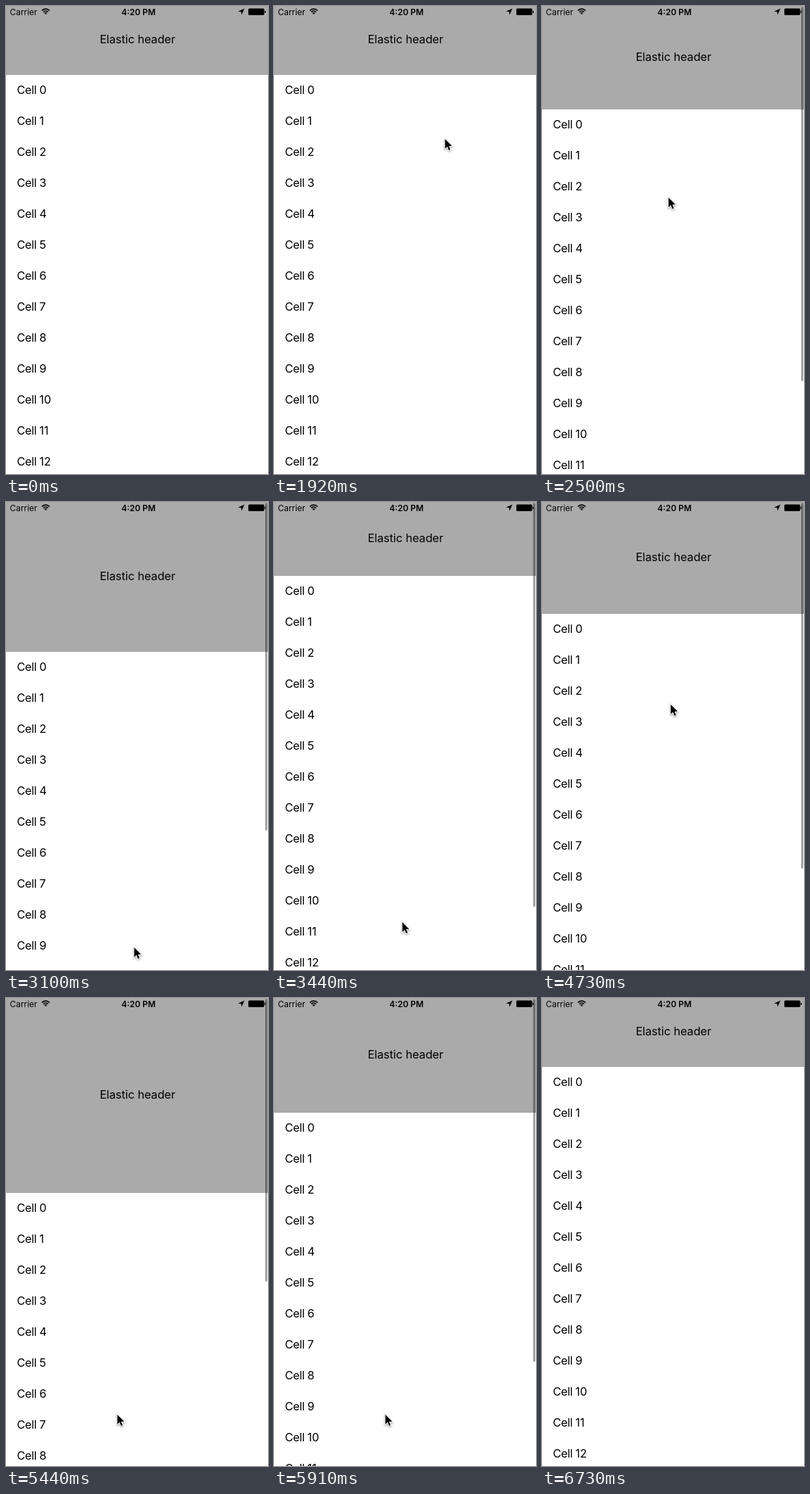
Write an HTML page with a canvas that moves like this. It is 373 px wide and 665 px high and loops after 6970 ms.

```html
<!DOCTYPE html>
<html lang="en">
<head>
<meta charset="utf-8">
<title>Elastic header</title>
<style>
  html, body { margin: 0; width: 100%; height: 100%; overflow: hidden; background: #fff; }
  canvas { display: block; }
</style>
</head>
<body>
<canvas id="stage" width="373" height="665"></canvas>
<script>
const W = 373, H = 665, LOOP = 6970, STEP = 117.2, START = 1908;
const REST = 98, ROW = 44, LAG = .15;
const FONT = 'Inter, Roboto, "Liberation Sans", sans-serif';
const ctx = document.getElementById('stage').getContext('2d');

// Pointer strokes, timed in steps after START
const home = { x: 243.5, y: 189 };
const moves = [
  { from: 0, to: 3, x: 180, y: 146 },
  { from: 4, to: 7, x: 182.5, y: 633 },
  { from: 12, to: 17, x: 201.5, y: 288 },
  { from: 17, to: 22, x: 186, y: 148 },
  { from: 22, to: 27.35, x: 158.5, y: 592 },
  { from: 34, to: 40, x: 284, y: 646 }
];
const drags = [
  { down: 4, release: 8.93, hide: 17 },
  { down: 22, release: 32.3, hide: 41 }
];

const clamp = v => Math.max(0, Math.min(1, v));
const ease = f => f * f * (3 - 2 * f);

function pointerAt(k) {
  return moves.reduce((p, m) => {
    const e = ease(clamp((k - m.from) / (m.to - m.from)));
    return { x: p.x + (m.x - p.x) * e * e, y: p.y + (m.y - p.y) * e };
  }, home);
}

const rubberBand = d => H * (1 - 1 / (1 + .55 * d / H));

// Critically damped return to rest
function bounce(steps) {
  const x = 1.277 * Math.max(0, steps);
  return (1 + x) * Math.exp(-x);
}

function overscroll(drag, k) {
  const held = Math.min(k, drag.release) - LAG;
  const distance = pointerAt(held).y - pointerAt(drag.down).y;
  return rubberBand(distance) * bounce(k - drag.release);
}

function text(str, x, y, size, spacing = 0, align = 'left', weight = 400) {
  ctx.font = `${weight} ${size}px ${FONT}`;
  ctx.letterSpacing = spacing + 'px';
  ctx.textAlign = align;
  ctx.fillText(str, x, y);
}

function polygon(...points) {
  ctx.beginPath();
  points.forEach(([x, y]) => ctx.lineTo(x, y));
  ctx.closePath();
}

function pill(x, y, w, h, r) {
  ctx.beginPath();
  ctx.roundRect(x, y, w, h, r);
  ctx.fill();
}

function drawStatus() {
  text('Carrier', 5.6, 12.5, 11.9);
  text('4:20 PM', 188.6, 12.5, 11.9, 0, 'center', 600);

  const from = -Math.PI * .75, to = -Math.PI / 4;
  ctx.lineWidth = 1.7;
  for (const r of [4.8, 7.8]) {
    ctx.beginPath();
    ctx.arc(56.5, 12, r, from, to);
    ctx.stroke();
  }
  ctx.beginPath();
  ctx.moveTo(56.5, 12);
  ctx.arc(56.5, 12, 2.8, from, to);
  ctx.fill();

  polygon([339.5, 3.5], [335.3, 12.7], [334.8, 8.2], [330.3, 7.7]);
  ctx.fill();

  pill(345, 3.5, 22.6, 9.4, 1.6);
  pill(368.3, 6.7, 1.4, 3.2, .7);
}

function drawPointer({ x, y }) {
  ctx.save();
  ctx.translate(x, y);
  polygon([0, 0], [0, 13.8], [3.2, 10.8], [5.4, 16], [7.6, 15], [5.4, 10], [9.8, 9.8]);
  ctx.shadowColor = 'rgba(0,0,0,.45)';
  ctx.shadowBlur = 2.5;
  ctx.shadowOffsetY = 1;
  ctx.strokeStyle = '#fff';
  ctx.lineWidth = 2;
  ctx.stroke();
  ctx.shadowColor = 'transparent';
  ctx.fill();
  ctx.restore();
}

function draw(time) {
  const k = Math.floor((time % LOOP - START) / STEP);
  const drag = drags.find(d => k > d.down && k < d.hide);
  const edge = Math.round(REST + (drag ? overscroll(drag, k) : 0));

  ctx.fillStyle = '#fff';
  ctx.fillRect(0, 0, W, H);
  ctx.fillStyle = '#aaa';
  ctx.fillRect(0, 0, W, edge);

  ctx.fillStyle = ctx.strokeStyle = '#000';
  text('Elastic header', 187.2, edge / 2 + 4.4, 16.3, -.07, 'center');
  for (let i = 0, y = edge; y < H; i++, y += ROW) text('Cell ' + i, 15.4, y + 27.2, 16.3, -.33);
  drawStatus();

  if (drag) {
    ctx.globalAlpha = .36 * clamp((drag.hide - k) / 2);
    pill(369, 1.5, 3, 678.5 - edge, 1.5);
    ctx.globalAlpha = 1;
  }
  if (k >= 0 && k < 41) drawPointer(pointerAt(k));
}

const begin = performance.now();
function tick() {
  draw(performance.now() - begin);
  requestAnimationFrame(tick);
}
tick();
</script>
</body>
</html>
```
